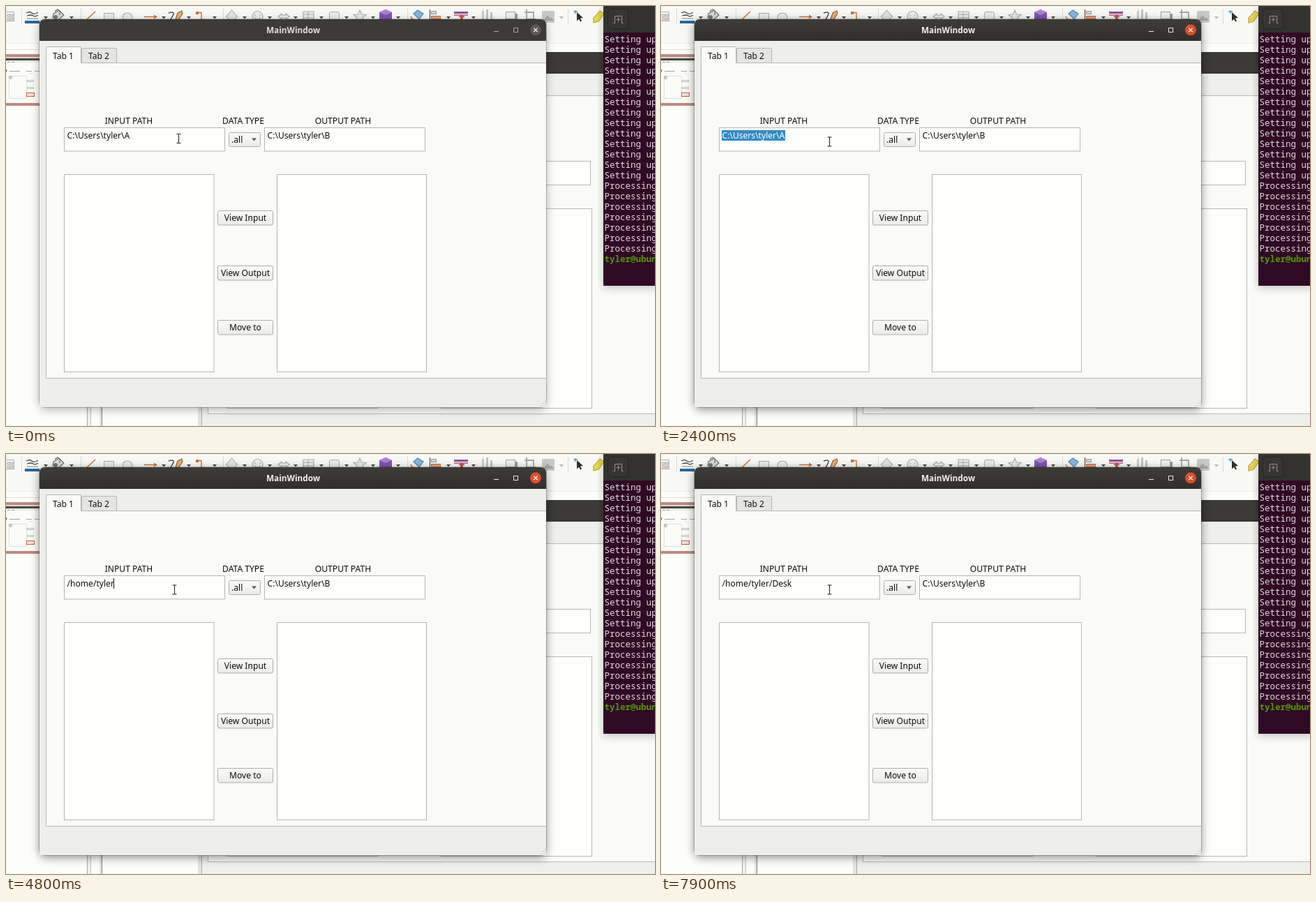
Animation, 930 px wide and 602 px high, one loop 8 s. Source, as an HTML page:

```html
<!DOCTYPE html>
<html lang="en">
<head>
<meta charset="utf-8">
<title>Path form</title>
<style>
html, body { margin: 0; width: 100%; height: 100%; overflow: hidden; background: #fdfefa; }
svg { display: block; width: 930px; height: 602px; }
text { font-family: "Noto Sans", "Open Sans", sans-serif; font-size: 12.1px; font-weight: 500; white-space: pre; }
.mono text { font-family: "Noto Sans Mono", "DejaVu Sans Mono", monospace; font-size: 12.5px; font-weight: 400; }
</style>
</head>
<body>
<svg id="stage" viewBox="0 0 930 602" xmlns="http://www.w3.org/2000/svg">
  <defs>
    <filter id="soft" x="-10%" y="-10%" width="120%" height="120%"><feGaussianBlur stdDeviation="7"/></filter>
    <linearGradient id="bar" x2="0" y2="1"><stop offset="0" stop-color="#3d3c38"/><stop offset="1" stop-color="#302f2b"/></linearGradient>
    <linearGradient id="btn" x2="0" y2="1"><stop offset="0" stop-color="#fafaf7"/><stop offset="1" stop-color="#ebebe7"/></linearGradient>
  </defs>
  <g id="back"></g>
  <g id="icons" fill="none" stroke="#aaa9a7" stroke-width="1.1"></g>
  <g id="term" class="mono"></g>
  <g id="win"></g>
</svg>
<script>
const NS = "http://www.w3.org/2000/svg";
const $ = id => document.getElementById(id);

function add(parent, tag, attrs, content) {
  const el = document.createElementNS(NS, tag);
  for (const k in attrs) el.setAttribute(k, attrs[k]);
  if (content !== undefined) el.textContent = content;
  parent.appendChild(el);
  return el;
}
const rect = (p, x, y, width, height, fill, more) => add(p, "rect", { x, y, width, height, fill, ...more });
const frame = (p, x, y, w, h, fill, stroke, rx = 0) =>
  rect(p, x + .5, y + .5, w - 1, h - 1, fill, { stroke, rx, "stroke-width": 1 });
const path = (p, d, more) => add(p, "path", { d, ...more });
const label = (p, x, y, s, more) => add(p, "text", { x, y, fill: "#0c0c0b", ...more }, s);
const mid = (p, x, y, s, more) => label(p, x, y, s, { "text-anchor": "middle", ...more });

function drawBack(g) {
  const edge = "#b9b9b5";
  rect(g, 0, 0, 930, 602, "#fdfefa");
  rect(g, 0, 0, 930, 53, "#f8f9f5");
  rect(g, 0, 53, 930, 1, "#ecece8");
  rect(g, 0, 62, 48, 1, "#dcdcd7");
  // slide thumbnail
  rect(g, 0, 69, 48, 74, "#bd8a82");
  rect(g, 0, 73, 48, 66, "#fbfcf8");
  rect(g, 0, 73, 48, 3, "#dcd7d3");
  rect(g, 0, 75, 48, 3, "#4a4946");
  rect(g, 0, 78, 48, 3, "#e8e8e4");
  path(g, "M0 92.500h2M5 93.500h15M29 93.500h8M41 93.500h7M2 80.500h4M8 80.500h4", { stroke: "#a5a5a1" });
  path(g, "M4.500 100.500h25v32h-25zM33 96.500h5", { fill: "none", stroke: "#e0e0dc" });
  path(g, "M5 101h3v3h-3z", { fill: "none", stroke: "#999" });
  for (const y of [106, 116]) frame(g, 30, y, 10, 3, "#eee", "#c3c3bf");
  frame(g, 29, 124, 12, 6, "#f4e2d8", "#c0603c");
  path(g, "M0 91v4", { stroke: "#d4582a", "stroke-width": 2 });
  // editor panes
  rect(g, 116, 560, 1, 42, "#aaa9a6");
  rect(g, 117, 560, 4, 42, "#f1f1ed");
  rect(g, 121, 560, 1, 42, "#c2c2be");
  rect(g, 134, 560, 3, 42, "#e4e4e0");
  rect(g, 137, 560, 1, 42, "#83827f");
  rect(g, 275, 560, 5, 42, "#e3e3df");
  rect(g, 280, 560, 1, 42, "#aaa9a6");
  // enlarged screenshot on the slide
  rect(g, 281, 97, 649, 505, "#efefeb");
  rect(g, 281, 66, 649, 31, "#3b3a36");
  frame(g, 289, 128, 660, 457, "#fafbf7", edge);
  frame(g, 600, 222, 238, 35, "#fefefb", edge);
  frame(g, 317, 290, 216, 287, "#fefefb", edge);
  frame(g, 623, 290, 217, 287, "#fefefb", edge);
}

function drawIcons(g) {
  const dark = "#4a4a4a", orange = "#d06a3c";
  frame(g, -1, 8, 13, 14, "none", "#b0b0ae");
  path(g, "M2 12h3v3h-3zM7 12h3v3h-3zM2 17h3v3h-3zM7 17h3v3h-3z", { stroke: "#a3a3a1" });
  path(g, "M29 10q5-3 8 0t9-1M30 14q6-2 9 0t7-1", { stroke: dark, "stroke-width": 1.3 });
  path(g, "M30 18h16", { stroke: "#888" });
  rect(g, 27, 21, 21, 4, "#2a65a2", { stroke: "none" });
  path(g, "M68 11l8-5 7 7-8 7-8-3zM70 8q4-6 7-1v6", { stroke: "#666", fill: "#dcdcda" });
  add(g, "circle", { cx: 71, cy: 16, r: 3, fill: "#777", stroke: "none" });
  path(g, "M115 20L128 8", { stroke: orange, "stroke-width": 1.4 });
  frame(g, 140, 10, 15, 13, "#ececea", "#a9a9a7");
  add(g, "ellipse", { cx: 174, cy: 16, rx: 7, ry: 6, fill: "#ececea" });
  path(g, "M198 15.500h15", { stroke: orange, "stroke-width": 1.4 });
  path(g, "M212 12.500l5 3-5 3z", { fill: orange, stroke: "none" });
  path(g, "M233 10q10-3 6 4t-4 5", { stroke: dark, "stroke-width": 1.5 });
  path(g, "M243 19l3-9 6-3 1 4-6 9z", { fill: "#e3b07b", stroke: "#8b5a2c" });
  path(g, "M274 9.500h6v10h5", { stroke: orange, "stroke-width": 1.4 });
  rect(g, 272, 8, 4, 4, orange, { stroke: "none" });
  path(g, "M323.500 6l8 9-8 9-8-9z", { fill: "#e4e4e2" });
  add(g, "circle", { cx: 360.5, cy: 15, r: 7.5, fill: "#eeeeec" });
  path(g, "M357 12v2M364 12v2M356 17q4 4 9 0");
  path(g, "M390 15l5-4v2h6v-2l5 4-5 4v-2h-6v2z", { fill: "#eeeeec" });
  path(g, "M426 8h15v14h-15zM426 12h15M426 17h15M433 8v14", { fill: "#eeeeec" });
  frame(g, 463, 8, 15, 13, "#ececea", "#a9a9a7", 2);
  path(g, "M507 6l2.500 6 6.500.500-5 4 2 6-6-3-6 3 2-6-5-4 6.500-.500z", { fill: "#e9e9e7" });
  path(g, "M535 9l9-4 9 4v10l-9 4-9-4z", { fill: "#8253b4", stroke: "none" });
  path(g, "M535 9l9-4 9 4-9 4z", { fill: "#a783cf", stroke: "none" });
  path(g, "M584 11l6-5 8 5-6 8z", { fill: "#8ab6dc", stroke: "#4a82b2" });
  path(g, "M580 15q2 5 7 5", { stroke: orange, "stroke-width": 1.6 });
  path(g, "M607.500 5v18", { stroke: dark });
  frame(g, 609, 7, 8, 5, "#d5d5d3", "#999997");
  frame(g, 609, 14, 14, 5, "#e2a48a", orange);
  rect(g, 642, 8, 20, 3, "#8253b4", { stroke: "none" });
  rect(g, 642, 12, 20, 2, "#d1827c", { stroke: "none" });
  path(g, "M651 20v-4h-3l5-4 5 4h-3v4z", { fill: "#d1504c", stroke: "none" });
  for (const [x, y] of [[682, 7], [688, 5], [694, 9]])
    rect(g, x, y, 3, 21 - y, "#c0c0be", { stroke: "none" });
  rect(g, 719, 11, 14, 11, "#999997", { stroke: "none" });
  frame(g, 716, 8, 14, 11, "#f1f1ef", "#a0a09e");
  path(g, "M746 5v14h13M743 9h13v13", { stroke: "#a5a5a3", "stroke-width": 1.8 });
  rect(g, 768, 7, 18, 17, "#c8c8c6", { stroke: "none" });
  path(g, "M770 21l6-8 4 5 2-2 3 5z", { fill: "#a5a5a3", stroke: "none" });
  path(g, "M813 8h6M816 6v5", { stroke: "#5b9bd0", "stroke-width": 1.6 });
  path(g, "M818 9l9 8-4 .500 2 4-2 1-2-4-3 3z", { fill: "#2d2d2b", stroke: "none" });
  path(g, "M842 17l9-10 6 4-8 11-7 2z", { fill: "#e7d54c", stroke: "#b9a23a" });
  for (const x of [57, 94, 226, 262, 299, 342, 378, 415, 452, 488, 526, 562, 634, 670, 796])
    path(g, `M${x - 3} 15h6l-3 3.500z`, { fill: x === 796 ? "#b5b5b3" : "#444", stroke: "none" });
  for (const x of [22, 107, 311, 575, 683, 805])
    path(g, `M${x + .5} 4v22`, { stroke: "#d9d9d5", "stroke-width": 1 });
}

function drawTerminal(g) {
  rect(g, 856, 2, 80, 401, "#000", { opacity: .25, filter: "url(#soft)" });
  rect(g, 856, 0, 74, 38, "#33322e");
  frame(g, 862, 4, 30, 29, "#373632", "#272623", 4);
  path(g, "M870.500 24.500h2v-10h10v10h2M877.500 16.500v6M874.500 19.500h6", { fill: "none", stroke: "#93928e" });
  rect(g, 856, 38, 74, 363, "#300a24");
  for (let i = 0; i < 21; i++)
    label(g, 857.5, 52 + i * 15, i < 14 ? "Setting up" : "Processing", { fill: "#dfd9dd" });
  label(g, 857.5, 367, "tyler@ubun", { fill: "#4e9a06", style: "font-weight:700" });
}

function drawWindow(g) {
  const edge = "#b6b6b2", body = "#eeeeea", pane = "#fafbf7", field = "#fefefb";
  const shadow = rect(g, 48, 22, 726, 556, "#000", { rx: 8, filter: "url(#soft)" });
  frame(g, 47, 18, 728, 558, "none", "rgba(0,0,0,.22)", 8);
  path(g, "M48 575V27q0-8 8-8H766q8 0 8 8V575z", { fill: body });
  const bar = path(g, "M48 50V27q0-8 8-8H766q8 0 8 8V50z");
  const title = mid(g, 411.5, 39, "MainWindow",
    { style: "font-family:'Open Sans','Noto Sans',sans-serif;font-size:11.8px;font-weight:700" });
  const controls = path(g, "M699 36.500h7M727.500 31.500h6v6h-6z", { fill: "none" });
  const close = add(g, "circle", { cx: 759, cy: 34.3, r: 8 });
  path(g, "M756.300 31.600l5.400 5.400m0-5.400l-5.400 5.400", { stroke: "#fff", "stroke-width": 1.1 });

  rect(g, 57, 81, 717, 453, pane);
  path(g, "M774 81.500H57.500V533.500H774", { fill: "none", stroke: edge });
  frame(g, 108, 60, 51, 22, "#e5e5e1", edge, 1.5);
  path(g, "M57.500 82V60q0-1.500 1.500-1.500h47q1.500 0 1.500 1.500V81.500", { fill: pane, stroke: edge });
  rect(g, 58, 81, 49, 2, pane);
  mid(g, 82, 75.5, "Tab 1");
  mid(g, 133, 76, "Tab 2");

  mid(g, 176, 169, "INPUT PATH");
  mid(g, 340, 169, "DATA TYPE");
  mid(g, 483, 169, "OUTPUT PATH");
  frame(g, 83, 174, 231, 34.5, field, edge);
  frame(g, 370, 174, 231, 34.5, field, edge);
  label(g, 374.5, 190, "C:\\Users\\tyler\\B");
  frame(g, 319, 181, 46, 21, "url(#btn)", "#adada9", 2);
  label(g, 323, 196, ".all");
  path(g, "M352 189.500h7l-3.500 4z", { fill: "#555" });
  frame(g, 83, 241, 215.5, 284, field, edge);
  frame(g, 388, 241, 215, 284, field, edge);
  [["View Input", 293], ["View Output", 372], ["Move to", 450]].forEach(([s, y]) => {
    frame(g, 303, y, 80, 21.5, "url(#btn)", "#adada9", 2);
    mid(g, 343, y + 15.2, s);
  });
  for (let i = 0; i < 3; i++)
    for (let j = 0; j <= i; j++) rect(g, 772 - j * 3, 566 + i * 3, 1, 1, "#a5a5a1");

  const select = rect(g, 87, 178, 93, 15, "#308cc6");
  const typed = label(g, 87.5, 190, "");
  const caret = rect(g, 87, 178, 1, 15, "#111");
  const beam = add(g, "g", {});
  const d = "M-3 -6.500h2.500l.500 .500 .500 -.500h2.500M0 -6V6M-3 6.500h2.500l.500 -.500 .500 .500h2.500";
  path(beam, d, { fill: "none", stroke: "#fff", "stroke-width": 2.4 });
  path(beam, d, { fill: "none", stroke: "#222", "stroke-width": 1.1 });
  return { shadow, bar, title, controls, close, select, typed, caret, beam };
}

drawBack($("back"));
drawIcons($("icons"));
drawTerminal($("term"));
const ui = drawWindow($("win"));

const LOOP = 8000;
const OLD = "C:\\Users\\tyler\\A", NEW = "/home/tyler/Desk";
// [time, characters of NEW typed]
const keys = [[2500, 0], [3000, 1], [3400, 2], [3500, 3], [3700, 4], [3800, 5], [4200, 6], [4300, 7],
  [4600, 8], [4700, 10], [4800, 11], [5100, 12], [6900, 13], [7200, 14], [7600, 15], [7900, 16]];
// times at which the caret turns on or off, starting hidden
const blinks = [400, 1200, 1600, 2200, 2500, 2800, 3400, 5200, 5800, 6400, 7200, 7700];
const pointer = [[0, 247.5, 190], [700, 242.5, 194.5], [1000, 241.5, 194.5]];
const latest = (list, t) => list.filter(k => k[0] <= t).pop();

function render(t) {
  const active = t >= 400;
  ui.shadow.setAttribute("opacity", active ? .45 : .3);
  ui.bar.setAttribute("fill", active ? "url(#bar)" : "#3c3b37");
  ui.title.setAttribute("fill", active ? "#f3f2ee" : "#e2e1dd");
  ui.controls.setAttribute("stroke", active ? "#eeeeea" : "#aaa9a4");
  ui.close.setAttribute("fill", active ? "#e04f2b" : "#5a5955");

  const selected = t >= 2400 && t < 2500;
  const key = latest(keys, t);
  ui.typed.textContent = key ? NEW.slice(0, key[1]) : OLD;
  ui.typed.setAttribute("fill", selected ? "#fff" : "#0c0c0b");
  const width = ui.typed.textContent ? ui.typed.getComputedTextLength() : 0;
  ui.select.setAttribute("width", Math.round(width + 1.5));
  ui.select.setAttribute("visibility", selected ? "visible" : "hidden");
  ui.caret.setAttribute("x", Math.floor(87.5 + width));
  const on = blinks.filter(b => b <= t).length % 2;
  ui.caret.setAttribute("visibility", on ? "visible" : "hidden");

  const [, x, y] = latest(pointer, t);
  ui.beam.setAttribute("transform", `translate(${x} ${y})`);
}

const start = performance.now();
function tick() {
  render((performance.now() - start) % LOOP);
  requestAnimationFrame(tick);
}
tick();
</script>
</body>
</html>
```
